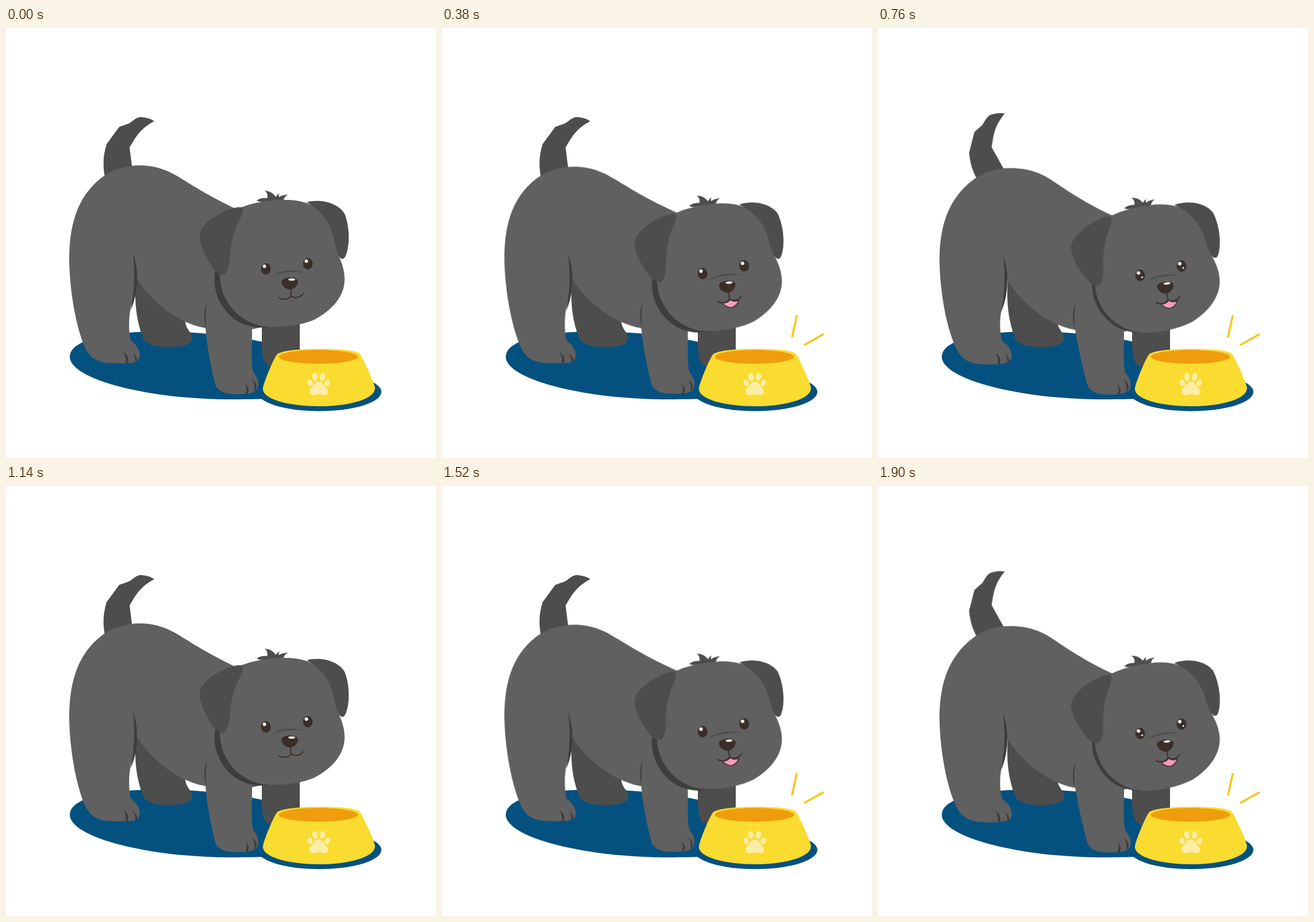
Recreate the animation shown at these times as an HTML page without scripts. Size 748 by 748 pixels, loop 2280 ms.

```html
<!DOCTYPE html>
<html lang="en">
<head>
<meta charset="utf-8">
<title>Puppy and bowl</title>
<style>
  html, body { margin: 0; width: 100%; height: 100%; overflow: hidden; background: #fff; }
  svg { display: block; width: 100vw; height: 100vh; }

  .mat { fill: #04517f; }
  .fur { fill: #606060; }
  .shade { fill: #4d4d4d; }
  .crease { fill: #3d3d3c; }
  .dark { fill: #3a2e29; }
  .shine { fill: #fff; }
  .mouth { fill: none; stroke: #3a2e29; stroke-width: 2; stroke-linecap: round; }
  .tongue { fill: #f59bc0; stroke: #3a2e29; stroke-width: 1.6; stroke-linejoin: round; }
  .spark { stroke: #f3c716; stroke-width: 3.5; stroke-linecap: round; }
  .paw { fill: #fbeda6; }

  .tail, .head, .collar, .upright, .lean, .far-leg, .open, .glint, .sparks {
    animation: 1140ms step-end infinite;
  }
  .tail { animation-name: wag; transform-origin: 195px 250px; }
  .head { animation-name: nod; transform-origin: 488px 415px; }
  .collar { animation-name: tuck; }
  .upright { animation-name: settle; transform-origin: 0 570px; }
  .lean { animation-name: lean; transform-origin: 0 570px; }
  .far-leg { animation-name: shift; }
  .open { animation-name: open; }
  .glint { animation-name: glint; }
  .sparks { animation-name: sparks; }

  @keyframes wag {
    0%, 33.333% { transform: none; }
    16.667%, 66.667% { transform: translate(0, 4px) rotate(-22deg); }
    50% { transform: translate(-1px, 4px) rotate(-8deg); }
  }
  @keyframes nod {
    0% { transform: none; }
    16.667% { transform: translate(-.5px, 5px) rotate(-3deg); }
    33.333% { transform: translate(1px, 6px) rotate(-3.6deg); }
    50% { transform: translate(2.3px, 7px) rotate(-4.2deg); }
    66.667% { transform: translate(3.5px, 7.8px) rotate(-5.7deg); }
  }
  @keyframes tuck { 0% { transform: none; } 50%, 100% { transform: translate(4px, -3px); } }
  @keyframes settle {
    0% { transform: none; visibility: visible; }
    16.667% { transform: scaleY(.994); visibility: visible; }
    33.333% { transform: scaleY(.993) skewX(.5deg); visibility: visible; }
    50%, 100% { visibility: hidden; }
  }
  @keyframes lean {
    0% { visibility: hidden; }
    50% { visibility: visible; transform: none; }
    66.667%, 100% { visibility: visible; transform: scaleY(.995); }
  }
  @keyframes shift { 0% { transform: none; } 50%, 100% { transform: translate(-3px, 0); } }
  @keyframes open { 0% { visibility: hidden; } 33.333%, 100% { visibility: visible; } }
  @keyframes glint { 0% { visibility: hidden; } 66.667%, 100% { visibility: visible; } }
  @keyframes sparks {
    0%, 50% { visibility: hidden; }
    33.333%, 66.667%, 100% { visibility: visible; }
  }
</style>
</head>
<body>
<svg viewBox="0 0 748 748">
  <defs>
    <path id="thigh" d="M221 393C231 418 231 460 217 491C223 460 225 430 221 393Z"/>
    <path id="elbow" d="M350 477C347 492 347 505 348 521C344 507 344 491 350 477Z"/>
    <g id="eye">
      <ellipse class="dark" rx="8.5" ry="10"/>
      <circle class="shine" cx="-2.5" cy="-4.5" r="3"/>
    </g>
    <g id="toes">
      <path d="M204 564C212 568 214 575 212 583L208 583C210 576 208 570 204 564Z"/>
      <path d="M220 566C227 570 229 575 228 581L225 581C225 575 224 570 220 566Z"/>
      <path d="M416 619C422 624 424 630 420 636L416 636C420 630 419 625 416 619Z"/>
      <path d="M428 611C435 616 437 622 435 629L432 632C433 624 432 618 428 611Z"/>
    </g>
  </defs>

  <g class="mat">
    <path d="M111 572C111 540 190 528 265 528C370 528 470 545 520 570V640C480 646 420 646 385 646C230 644 111 608 111 572Z"/>
    <ellipse cx="545" cy="633" rx="108" ry="33.5"/>
  </g>

  <g class="shade">
    <path d="M227 425C221 480 229 515 238 538C243 552 262 555 285 555C308 555 324 551 324 539C324 530 314 526 312 512L300 460Z"/>
    <path class="far-leg" d="M445 505V555C446 575 450 586 460 589H511V505Z"/>
    <path class="tail" d="M174 270C168 242 168 225 175 202L197 172L214 166C222 161 226 156 233 155C242 155 250 157 258 162C236 174 228 185 215 208L223 272Z"/>
  </g>

  <g class="upright">
    <path class="fur" d="M412 320C360 297 325 274 305 262C285 249 262 239 233 239C210 239 188 245 168 259C120 295 110 350 110 405C111 460 122 520 137 555C146 575 160 583 187 583C204 584 218 583 226 581C236 576 234 562 226 552C222 546 217 546 216 540C213 520 214 500 217 487C221 475 224 462 225 436L229 438C245 465 290 512 347 522C350 560 358 595 364 620C368 633 385 637 400 637C415 637 430 637 437 628C441 620 438 608 431 600C426 590 428 560 428 524L448 520L460 400Z"/>
    <g class="crease">
      <use href="#thigh"/><use href="#elbow"/><use href="#toes"/>
    </g>
  </g>
  <g class="lean">
    <path class="fur" d="M415 328C362 305 325 278 305 265C285 251 262 242 230 242C207 242 186 247 166 262C117 299 107 353 107 405C108 460 119 521 136 557C145 577 160 585 187 585C204 586 218 584 226 582C236 577 234 563 226 553C222 547 216 547 215 541C211 523 212 503 215 490C219 478 222 465 222 439L227 441C243 468 288 515 343 525C349 560 357 595 364 620C368 634 385 638 400 638C415 638 431 638 438 629C442 621 439 609 431 601C426 591 428 560 428 528L448 522L460 400Z"/>
    <g class="crease">
      <use href="#thigh" x="-3" y="3"/><use href="#elbow" x="-6" y="2"/><use href="#toes" y="1"/>
    </g>
  </g>

  <g class="head">
    <path class="crease collar" d="M364 422C358 455 372 487 398 507C418 520 440 524 462 519L440 500L390 430Z"/>
    <path class="shade" d="M440 302L436 300C441 296 448 295 454 296C456 291 454 286 450 283C460 284 466 288 469 294C471 291 473 289 476 288C474 291 474 293 475 294C480 291 485 290 491 290C486 292 484 295 483 299L460 304Z"/>
    <path class="fur" d="M405 314C430 302 465 299 490 299C520 300 548 311 560 330C575 348 573 372 576 390C583 405 589 420 589 437C589 468 566 492 535 508C510 518 475 522 448 519C405 512 372 475 372 430C375 400 390 340 405 314Z"/>
    <g class="shade">
      <path d="M523 303C545 297 577 303 589 323C598 345 599 380 590 398C587 403 583 403 579 397C573 388 573 372 567 355C560 333 545 315 523 303Z"/>
      <path d="M411 312C414 320 410 327 405 336C397 352 392 370 390 392C389 412 385 428 377 429C366 430 355 412 347 396C340 382 336 368 337 359C340 342 360 327 385 317C397 312 405 311 411 312Z"/>
      <path d="M462 431C478 421 498 419 522 426C500 423 480 425 462 431Z"/>
    </g>
    <use href="#eye" x="452" y="419"/>
    <use href="#eye" x="525" y="410"/>
    <g class="shine glint">
      <circle cx="455" cy="422.5" r="1.6"/>
      <circle cx="528" cy="413.5" r="1.6"/>
    </g>
    <path class="tongue open" d="M483 472C490 473 495 470 497 467C501 471 507 471 512 469C509 477 503 481 496 481C490 480 486 476 483 472Z"/>
    <path class="mouth" d="M495 454L496 466M475 469C480 473 491 473 496 466C502 471 512 469 517 462"/>
    <path class="dark" d="M479 442C479 436 488 434 495 434C503 434 508 437 508 442C507 449 500 455 494 455C487 455 480 449 479 442Z"/>
    <ellipse class="shine" cx="497" cy="437.5" rx="6" ry="2"/>
  </g>

  <path fill="#fadb2f" d="M472 567C480 561 515 558 544 558C575 558 607 560 615 566C620 572 637 609 641.5 624C646 644 600 658 545 658C490 658 444 645 447 626C449 614 466 574 472 567Z"/>
  <ellipse fill="#ef9d0d" cx="543.5" cy="572" rx="69" ry="12"/>
  <g class="paw">
    <path d="M544 615C551 615 553 622 557 626C563 631 560 640 552 639C547 637 541 637 536 639C528 640 525 631 531 626C535 622 537 615 544 615Z"/>
    <ellipse cx="529" cy="617.5" rx="4.5" ry="6" transform="rotate(-25 529 617.5)"/>
    <ellipse cx="537.5" cy="607" rx="4.8" ry="7" transform="rotate(-8 537.5 607)"/>
    <ellipse cx="550.5" cy="607" rx="4.8" ry="7" transform="rotate(8 550.5 607)"/>
    <ellipse cx="559" cy="617.5" rx="4.5" ry="6" transform="rotate(25 559 617.5)"/>
  </g>
  <path class="spark sparks" d="M617 501L609 537M663 533L631 551"/>
</svg>
</body>
</html>
```
